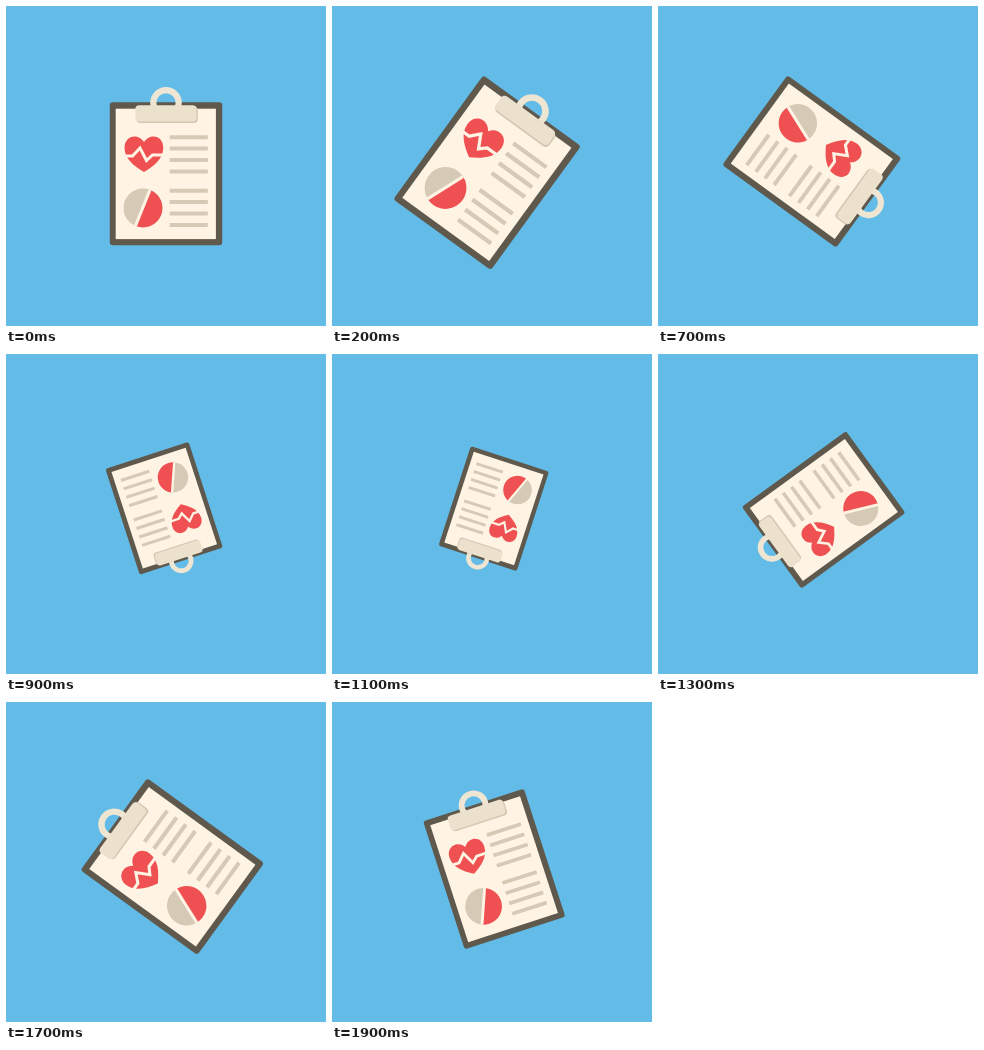
Animation, 320 px wide and 320 px high, one loop 2 s. Source, as an HTML page:

```html
<!DOCTYPE html>
<html lang="en">
<head>
<meta charset="utf-8">
<title>Spinning clipboard</title>
<style>
  html, body { margin: 0; width: 100%; height: 100%; overflow: hidden; background: #62bce7; }
  svg { display: block; width: 100vw; height: 100vh; }
</style>
</head>
<body>
<svg viewBox="0 0 320 320">
  <clipPath id="disc"><circle cx="137" cy="202" r="19.5"/></clipPath>
  <g id="board">
    <rect x="103.8" y="96.3" width="112.4" height="142.9" rx="3" fill="#5f584c"/>
    <rect x="109.7" y="102.7" width="100.2" height="130.4" fill="#fff4e3"/>

    <path fill="#ef5152" d="M138 166C128 160 118.5 153 118.5 141.5C118.5 135 123 130.5 128.5 130.5C133 130.5 136 133 138 136C140 133 143 130.5 147.5 130.5C153 130.5 157.3 135 157.3 141.5C157.3 153 148 160 138 166Z"/>
    <path fill="none" stroke="#fff4e3" stroke-width="3" d="M117 150H126.5L134 142L140.5 154.5L146.5 149H159"/>

    <g clip-path="url(#disc)">
      <g transform="rotate(22 137 202)">
        <rect x="116" y="181" width="21" height="42" fill="#d5cab6"/>
        <rect x="137" y="181" width="21" height="42" fill="#ef5152"/>
        <rect x="135.2" y="181" width="3" height="42" fill="#fff4e3"/>
      </g>
    </g>

    <path id="lines" stroke="#d5cab6" stroke-width="4"/>

    <circle cx="160" cy="96.8" r="12.7" fill="none" stroke="#efe5d3" stroke-width="6.2"/>
    <rect x="130.5" y="100.5" width="61.3" height="16.5" rx="4" fill="#d3c7b2"/>
    <rect x="129.3" y="99.3" width="61.2" height="16.2" rx="4" fill="#ece1cd"/>
  </g>
</svg>
<script>
  const STEP = 100, STEPS = 20;

  // [step, scale] turning points, joined by cosine easing
  const scaleKeys = [[-4.8, .88], [4.8, 1.12], [10.4, .72], [15.4, 1.06], [19, .942]];

  const board = document.getElementById('board');

  document.getElementById('lines').setAttribute('d',
    [131.2, 184.7].flatMap(top =>
      [0, 1, 2, 3].map(i => `M163.6 ${top + i * 11.4}H201.8`)).join(''));

  function scaleAt(step) {
    const end = scaleKeys.findIndex(([at]) => at >= step);
    const [from, a] = scaleKeys[end - 1], [to, b] = scaleKeys[end];
    const phase = (step - from) / (to - from);
    return a + (b - a) * (1 - Math.cos(Math.PI * phase)) / 2;
  }

  function draw() {
    const step = Math.floor((performance.now() + 1) / STEP) % STEPS;
    board.setAttribute('transform',
      `translate(160 160) rotate(${step * 360 / STEPS}) scale(${scaleAt(step)}) translate(-160 -160)`);
    requestAnimationFrame(draw);
  }
  draw();
</script>
</body>
</html>
```
